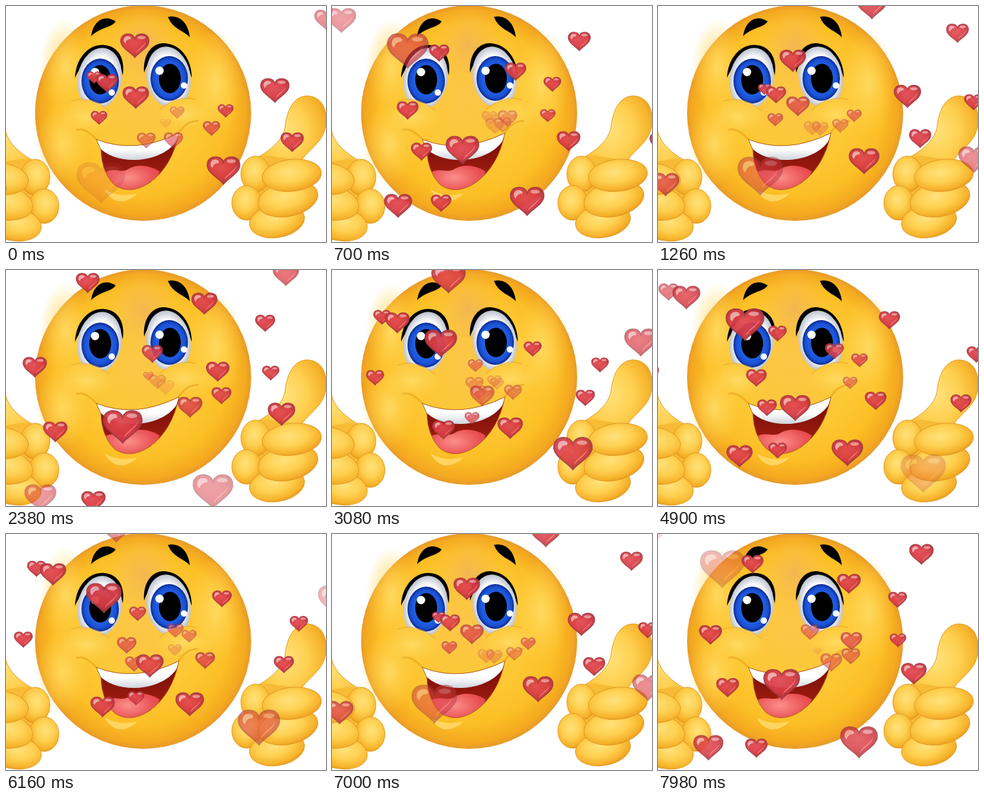
Animation, 496 px wide and 368 px high, one loop 8000 ms. Source, as an HTML page:

```html
<!DOCTYPE html>
<html lang="en">
<head>
<meta charset="utf-8">
<title>Smiley with hearts</title>
<style>
  html, body { margin: 0; width: 100%; height: 100%; overflow: hidden; background: #fff; }
  svg { display: block; width: 496px; height: 368px; }
</style>
</head>
<body>
<svg viewBox="0 0 496 368">
  <defs>
    <radialGradient id="skin" gradientUnits="userSpaceOnUse" cx="212" cy="167" r="168" fx="208" fy="140">
      <stop offset="0" stop-color="#fcc648"/>
      <stop offset=".55" stop-color="#fdc834"/>
      <stop offset=".8" stop-color="#fcbf26"/>
      <stop offset=".95" stop-color="#f4a91f"/>
      <stop offset="1" stop-color="#e79a2a"/>
    </radialGradient>
    <radialGradient id="light">
      <stop offset="0" stop-color="#ffdc66" stop-opacity=".9"/>
      <stop offset="1" stop-color="#ffd24c" stop-opacity="0"/>
    </radialGradient>
    <radialGradient id="peach">
      <stop offset="0" stop-color="#f3b454" stop-opacity=".9"/>
      <stop offset="1" stop-color="#f8bd4c" stop-opacity="0"/>
    </radialGradient>
    <radialGradient id="finger" cx=".45" cy=".4" r=".62">
      <stop offset="0" stop-color="#ffe27c"/>
      <stop offset=".5" stop-color="#fed050"/>
      <stop offset=".85" stop-color="#f6b22a"/>
      <stop offset="1" stop-color="#e79a20"/>
    </radialGradient>
    <radialGradient id="white">
      <stop offset=".7" stop-color="#fff"/>
      <stop offset="1" stop-color="#bcc2ce"/>
    </radialGradient>
    <radialGradient id="iris">
      <stop offset=".5" stop-color="#2468ea"/>
      <stop offset=".85" stop-color="#1a50d4"/>
      <stop offset="1" stop-color="#0b2a8c"/>
    </radialGradient>
    <linearGradient id="mouth" x2="0" y2="1">
      <stop offset="0" stop-color="#6e0b05"/>
      <stop offset="1" stop-color="#b52314"/>
    </linearGradient>
    <radialGradient id="tongue" cx=".45" cy=".4">
      <stop offset="0" stop-color="#fb8f8a"/>
      <stop offset="1" stop-color="#e84c50"/>
    </radialGradient>
    <linearGradient id="teeth" x2="0" y2="1">
      <stop offset=".6" stop-color="#fff"/>
      <stop offset="1" stop-color="#cfd3dc"/>
    </linearGradient>
    <radialGradient id="red" cx=".45" cy=".4" r=".6">
      <stop offset="0" stop-color="#e24a50"/>
      <stop offset=".6" stop-color="#d83a43"/>
      <stop offset="1" stop-color="#b53039"/>
    </radialGradient>
    <clipPath id="lips">
      <path d="M140 208Q200 232 268 198Q258 250 222 276Q190 296 167 278Q148 258 147 224Z"/>
    </clipPath>
    <g id="hand" fill="url(#finger)" stroke="#e29a24" stroke-width="1">
      <path d="M378 242C402 231 426 214 432 192C435 164 444 141 467 140C494 142 499 168 495 190C490 214 468 224 456 244L440 275Z"/>
      <path d="M380 244L405 233L450 240V330L400 335L372 320Z" fill="#f8bb36" stroke="none"/>
      <ellipse cx="387" cy="262" rx="23" ry="28"/>
      <ellipse cx="373" cy="307" rx="23" ry="27"/>
      <ellipse cx="420" cy="335" rx="43" ry="26" transform="rotate(-10 420 335)"/>
      <ellipse cx="437" cy="301" rx="47" ry="27" transform="rotate(-12 437 301)"/>
      <ellipse cx="443" cy="264" rx="46" ry="25" transform="rotate(-6 443 264)"/>
    </g>
    <g id="heart">
      <path d="M0 42C-15 23-50 8-50-17C-50-34-38-42-25-42C-12-42-3-35 0-25C3-35 12-42 25-42C38-42 50-34 50-17C50 8 15 23 0 42Z" fill="url(#red)" stroke="#a53a42" stroke-width="4"/>
      <path d="M-40-19C-40-30-32-35-24-34C-14-33-12-26-16-23C-26-23-32-17-34-8C-38-11-40-14-40-19Z" fill="#fff" opacity=".55"/>
      <ellipse cx="24" cy="-29" rx="14" ry="6" fill="#fff" opacity=".45"/>
      <path d="M40-15C38 2 16 13 2 30C8 11 32 4 40-15Z" fill="#ff9c98" opacity=".6"/>
    </g>
  </defs>

  <ellipse cx="212.500" cy="167" rx="167.500" ry="168" fill="url(#skin)"/>
  <ellipse cx="212" cy="62" rx="52" ry="62" fill="url(#peach)"/>
  <ellipse cx="92" cy="95" rx="40" ry="75" fill="url(#light)"/>
  <ellipse cx="88" cy="215" rx="42" ry="65" fill="url(#light)"/>
  <ellipse cx="325" cy="120" rx="42" ry="85" fill="url(#light)"/>

  <g id="brows">
    <path d="M132 47C135 24 152 12 170 24C164 34 146 33 132 47Z"/>
    <path d="M251 17C270 13 283 28 285 49C276 38 259 37 251 17Z"/>
  </g>

  <g id="eyes">
    <path d="M107 112C108 82 128 58 153 61C174 63 185 82 181 108C174 72 130 60 107 112Z"/>
    <ellipse cx="145" cy="113" rx="34" ry="48" fill="url(#white)" transform="rotate(10 145 113)"/>
    <ellipse cx="146" cy="117" rx="29" ry="35" fill="url(#iris)"/>
    <ellipse cx="146" cy="115" rx="17" ry="23"/>
    <path d="M214 104C212 76 226 57 246 58C272 60 288 84 288 112C272 64 232 54 214 104Z"/>
    <ellipse cx="252" cy="111" rx="34" ry="48" fill="url(#white)" transform="rotate(-10 252 111)"/>
    <ellipse cx="253" cy="113" rx="29" ry="35" fill="url(#iris)"/>
    <ellipse cx="254" cy="113" rx="17" ry="23"/>
    <g fill="#fff">
      <circle cx="138" cy="103" r="6.500"/><circle cx="164" cy="135" r="5"/>
      <circle cx="238" cy="101" r="6.500"/><circle cx="276" cy="124" r="5"/>
    </g>
  </g>

  <path d="M98 150C120 141 142 149 158 163L140 178L104 174Z" fill="#fdca40"/>
  <path d="M238 162C254 147 278 139 303 150L296 174L250 178Z" fill="#fdc83a"/>
  <ellipse cx="124" cy="173" rx="46" ry="27" fill="url(#light)"/>
  <ellipse cx="276" cy="169" rx="46" ry="26" fill="url(#light)"/>
  <g fill="none" stroke="#e9a01e" stroke-linecap="round">
    <path d="M102 148C122 141 144 149 160 163M238 162C254 147 276 140 294 146" stroke-width="1.500" opacity=".6"/>
    <path d="M110 193Q124 190 140 208M268 198Q278 180 297 179" stroke-width="3" opacity=".6"/>
  </g>

  <g clip-path="url(#lips)">
    <rect x="138" y="195" width="132" height="100" fill="url(#mouth)"/>
    <path d="M150 262C164 250 178 262 190 254C204 246 222 248 238 258L225 295H160Z" fill="url(#tongue)"/>
    <path d="M138 200L140 208Q200 232 268 198L264 211C240 246 170 250 144 220Z" fill="url(#teeth)"/>
  </g>
  <path d="M140 208Q200 232 268 198Q258 250 222 276Q190 296 167 278Q148 258 147 224Z" fill="none" stroke="#b5611a" stroke-width="1"/>
  <path d="M153 286Q176 300 204 292Q190 307 172 304Q158 299 153 286Z" fill="#ffdf74" opacity=".75"/>

  <use href="#hand"/>
  <use href="#hand" transform="translate(432 5) scale(-1 1)"/>
  <g id="hearts"></g>
</svg>
<script>
const STEP = 140, LOOP = 8000, LIFE = 10, HELD_STEP = 34;
const CENTER = { x: 247.5, y: 183 };

// birth step, velocity x and y per step, width at birth
const hearts = [
  [8, 37.4, 4.2, 24], [7.4, 37.4, -7.8, 21], [9.2, 23.7, -22.3, 21],
  [6, -28.6, -18.4, 14], [6.5, -27, -18.6, 25], [7.2, -38.5, -3.2, 22],
  [0.6, -19, -25.6, 20], [1.6, 11.3, -24.6, 21], [1.7, 29.6, -19.2, 21],
  [2.6, 38, -5.2, 21], [0.8, 29.2, 6.8, 24], [1.2, -35.4, -5.5, 27],
  [1.3, -30.4, 12.3, 24], [0, -16, 25.4, 17], [8.6, -22.8, 20.2, 25],
  [7, -16.1, -14, 27], [4.6, -9, -22.8, 23], [4.1, 29, -8.8, 28],
  [4.5, 36.2, 5.4, 27], [8.5, 8.5, 18.8, 23], [4.7, 17.2, 14.1, 28],
  [0.5, -10.3, 9.5, 31]
].map(([birth, vx, vy, width]) => {
  const el = document.createElementNS("http://www.w3.org/2000/svg", "use");
  el.setAttribute("href", "#heart");
  document.getElementById("hearts").append(el);
  // hearts flying closer to the viewer's axis grow faster
  const growth = Math.min(4.7, Math.max(0.8, 9 - 0.2 * Math.hypot(vx, vy)));
  return { el, birth, vx, vy, width, growth };
});

function draw(time) {
  const n = Math.floor(time % LOOP / STEP);
  const step = n < HELD_STEP ? n : n - 1;
  for (const { el, birth, vx, vy, width, growth } of hearts) {
    const age = (step - birth + LIFE) % LIFE;
    // approaching hearts speed up a little
    const travel = age * (0.93 + 0.01 * age);
    const x = CENTER.x + vx * travel, y = CENTER.y + vy * travel;
    const scale = (width + growth * age) / 104;
    el.setAttribute("transform", `translate(${x} ${y}) scale(${scale})`);
    el.setAttribute("opacity", Math.min(0.94, 0.15 + 0.3 * age, (LIFE - age) / 3));
  }
}

const start = performance.now();
function tick() {
  draw(performance.now() - start);
  requestAnimationFrame(tick);
}
tick();
</script>
</body>
</html>
```
